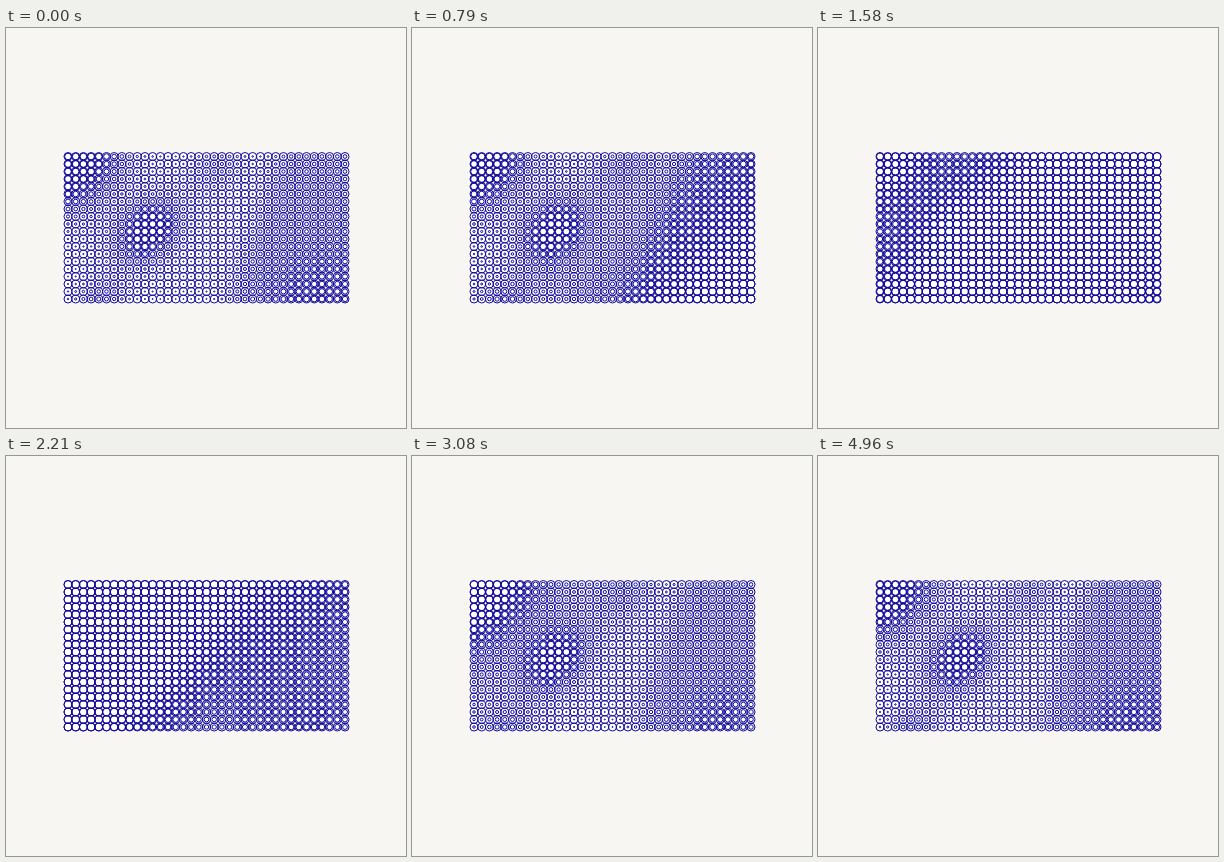
Write an HTML page with a canvas that moves like this. It is 400 px wide and 400 px high and loops after 5000 ms.

```html
<!DOCTYPE html>
<html lang="en">
<head>
<meta charset="utf-8">
<title>Pulsing rings</title>
<style>
  html, body { margin: 0; width: 100%; height: 100%; overflow: hidden; background: #f7f6f2; }
  canvas { display: block; width: 400px; height: 400px; }
</style>
</head>
<body>
<canvas id="stage"></canvas>
<script>
const LOOP = 5000, COLS = 37, ROWS = 20;
const LEFT = 62, TOP = 128.5, RIGHT = 339, BOTTOM = 271;
const RADIUS = 4, MAX_REST = 3.3, TAU = Math.PI * 2;
const FIRST_PEAK = 1000, DELAY = 3.6, SHARPNESS = 4, OVERSHOOT = 1.12;

const canvas = document.getElementById('stage');
const ctx = canvas.getContext('2d');
const dpr = window.devicePixelRatio || 1;
canvas.width = canvas.height = 400 * dpr;
ctx.scale(dpr, dpr);

const clamp = (v, lo, hi) => Math.min(hi, Math.max(lo, v));

function smoothstep(a, b, v) {
  const p = clamp((v - a) / (b - a), 0, 1);
  return p * p * (3 - 2 * p);
}

// A soft hill, stretched towards the upper right
function hill(dx, dy, size) {
  const along = (dx - dy) / Math.SQRT2 / (size * 1.35);
  const across = (dx + dy) / Math.SQRT2 / size;
  return Math.exp(-along * along - across * across);
}

function restRadius(x, y) {
  const slope = smoothstep(0, 45, x - 247 + (y - TOP) / 3);
  const r = 0.5 + 1.3 * slope
    + 3.6 * hill(x - 66, y - 134, 43)
    + 3.4 * hill(x - 142, y - 203, 26)
    + 1.1 * hill(x - 212, y - 137, 24)
    + 1.7 * hill(x - 92, y - 278, 22)
    + 0.9 * hill(x - 305, y - 272, 36);
  return Math.min(r, MAX_REST);
}

const cells = [];
for (let j = 0; j < ROWS; j++) {
  for (let i = 0; i < COLS; i++) {
    const x = LEFT + (RIGHT - LEFT) * i / (COLS - 1);
    const y = TOP + (BOTTOM - TOP) * j / (ROWS - 1);
    const peak = FIRST_PEAK + DELAY * (RIGHT - x + BOTTOM - y);
    cells.push({ x, y, peak, rest: restRadius(x, y) });
  }
}

function addCircle(path, x, y, r) {
  path.moveTo(x + r, y);
  path.arc(x, y, r, 0, TAU);
}

const outer = new Path2D();
for (const { x, y } of cells) addCircle(outer, x, y, RADIUS);

// Each cell swells to full size once per loop, the lower right first
function swell(t, peak) {
  const wave = (1 + Math.cos(TAU * (t - peak) / LOOP)) / 2;
  return Math.min(1, OVERSHOOT * wave ** SHARPNESS);
}

function draw(t) {
  ctx.fillStyle = '#f7f6f2';
  ctx.fillRect(0, 0, 400, 400);
  ctx.fillStyle = '#fff';
  ctx.fill(outer);

  const inner = new Path2D();
  for (const { x, y, peak, rest } of cells) {
    addCircle(inner, x, y, rest + (RADIUS - rest) * swell(t, peak));
  }
  ctx.strokeStyle = '#100898';
  ctx.lineWidth = 1;
  ctx.stroke(outer);
  ctx.stroke(inner);
}

const start = performance.now();
function tick() {
  draw((performance.now() - start) % LOOP);
  requestAnimationFrame(tick);
}
tick();
</script>
</body>
</html>
```
